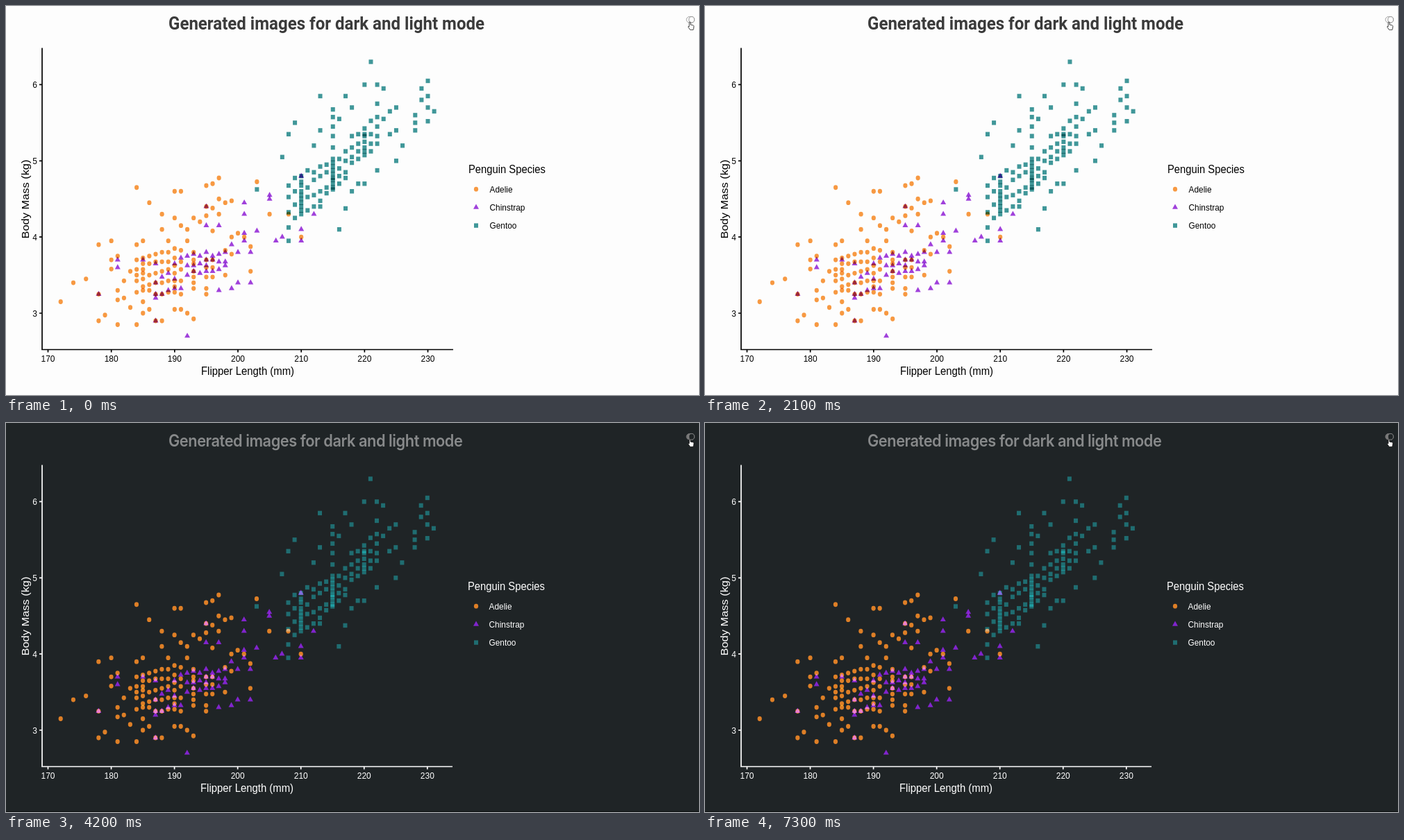
Animation of 998x561 px, one loop 7700 ms. Source, as an HTML page:

```html
<!DOCTYPE html>
<html lang="en">
<head>
<meta charset="utf-8">
<title>Dark and light chart</title>
<style>
  html, body { margin: 0; width: 100%; height: 100%; overflow: hidden; background: #fdfdfd; }
  svg { position: absolute; left: 0; top: 0; display: block; isolation: isolate; }
  text { font-family: "Liberation Sans", Arial, sans-serif; }
  .light .mark { mix-blend-mode: multiply; }
  .dark .mark { mix-blend-mode: screen; }
  .light .title { font: 700 26.5px Roboto, sans-serif; }
  .dark .title { font: 600 24px Inter, sans-serif; letter-spacing: -.5px; }
</style>
</head>
<body>
<script>
const LOOP = 7700, SWITCH = 3500;
const W = 998, H = 561;
const SQUEEZE = 0.908; // the whole page is narrowed horizontally

const themes = {
  light: {
    back: '#fdfdfd', ink: '#000', title: '#3b3b3b', colors: ['#f99a42', '#a140dd', '#40989a'],
    perMm: 9.117, axisEnd: 644, legend: 666,
    pill: 'none', knob: '#fdfdfd', rim: '#888', hand: '#333'
  },
  dark: {
    back: '#1f2426', ink: '#fff', title: '#87898a', colors: ['#da6a00', '#7000c4', '#005558'],
    perMm: 9.105, axisEnd: 643, legend: 665,
    pill: '#777', knob: '#1f2426', rim: '#888', hand: '#111'
  }
};

// Outlying values by column, from the given length upward; bands fill the dense core.
const species = [
  {
    name: 'Adelie', start: 172,
    outer: [[3.15], [], [3.4], [], [3.45], [], [3.9, 3.25, 2.9], [2.975], [3.95, 3.7, 3.58],
      [3.75, 3.3, 3.175, 2.85], [3.425, 3.2], [3.55, 3.075], [4.65, 3.9, 2.85], [3.95, 3.15, 3],
      [4.45, 3.05], [2.9], [4.3, 4.1, 2.9], [3.95], [4.6, 4.25, 3.05], [4.6, 4.15, 3.05],
      [4.1, 3.95, 3], [4.25, 2.925], [4.2], [4.675, 4.4, 4.28, 3.25], [4.7, 4.38, 4.08],
      [4.775, 4.5, 4.3], [4.45, 3.825, 3.5], [4.475, 4, 3.775], [4.05], [4], [3.875, 3.55],
      [4.725], [], [4.3], [], [], [4.3], [], [4]],
    bands: [
      { from: 184, to: 191, low: [3.3, 3.25], high: [3.7, 3.85], n: 5, heap: 7 },
      { from: 193, to: 193, low: [3.33, 3.33], high: [3.8, 3.8], n: 7 },
      { from: 195, to: 196, low: [3.33, 3.5], high: [3.7, 3.7], n: 3, heap: 4 }
    ]
  },
  {
    name: 'Chinstrap', start: 178,
    outer: [[3.25], [], [], [3.7, 3.6], [], [], [], [3.7], [], [3.65, 3.2, 2.9], [], [], [], [],
      [2.7], [], [], [4.4, 4.15], [], [4.15, 3.3], [], [3.9, 3.325], [3.8, 3.4],
      [4.45, 4.3, 4.05, 3.95], [3.8, 3.4], [4.08], [], [4.55, 4.5], [3.95], [4], [], [],
      [4.8, 4.1, 3.95], [], [4.3]],
    bands: [
      { from: 187, to: 191, low: [3.25, 3.3], high: [3.4, 3.7], n: 2, heap: 3 },
      { from: 192, to: 198, low: [3.5, 3.6], high: [3.75, 3.8], n: 3, heap: 4 }
    ]
  },
  {
    name: 'Gentoo', start: 203,
    outer: [[4.625], [], [], [], [5.05], [5.35, 3.95], [5.5], [], [], [5.2], [5.85, 5.4, 4.4], [],
      [], [5.55, 4.1], [5.85, 4.375], [5.7, 4.6], [4.7], [6, 4.7], [6.3], [6, 5.75, 4.875],
      [5.95, 5.55], [5.65, 5.35], [5.7, 5.4, 5], [5.2], [], [5.6, 5.5, 5.4], [5.95, 5.8],
      [6.05, 5.85, 5.7, 5.52], [5.65]],
    bands: [
      { from: 208, to: 217, low: [4.15, 4.75], high: [4.7, 5.1], n: 4, heap: 10 },
      { from: 215, to: 215, low: [5.2, 5.2], high: [5.65, 5.65], n: 5, heap: 5 },
      { from: 218, to: 222, low: [4.95, 5.2], high: [5.3, 5.55], n: 4, heap: 7 }
    ]
  }
];

let seed = 7;
const random = () => (seed = (seed * 16807) % 2147483647) / 2147483647;
const mix = (pair, k) => pair[0] + (pair[1] - pair[0]) * k;

function fillBand({ from, to, low, high, n, heap }) {
  const dots = [];
  for (let x = from; x <= to; x++) {
    const k = (x - from) / (to - from || 1);
    const count = x % 5 ? n : heap; // readings pile up on round lengths
    for (let i = 0; i < count; i++) {
      const at = (i + (random() - 0.5) * 0.5) / (count - 1);
      dots.push([x, Math.round(mix([mix(low, k), mix(high, k)], at) * 40) / 40]);
    }
  }
  return dots;
}

for (const s of species) {
  s.dots = s.outer.flatMap((ys, i) => ys.map(y => [s.start + i, y]));
  s.dots.push(...s.bands.flatMap(fillBand));
}

function add(parent, tag, attrs, content) {
  const el = document.createElementNS('http://www.w3.org/2000/svg', tag);
  for (const key in attrs) el.setAttribute(key, attrs[key]);
  if (content) el.textContent = content;
  parent.append(el);
  return el;
}

function label(svg, content, x, y, size, fill, anchor = 'start', turn = 0) {
  return add(svg, 'text', {
    transform: `translate(${x} ${y}) scale(${SQUEEZE} 1) rotate(${turn})`,
    'font-size': size, 'text-anchor': anchor, fill
  }, content);
}

const marks = [
  (svg, x, y, fill) => add(svg, 'ellipse', { class: 'mark', cx: x, cy: y, rx: 3.1, ry: 3.4, fill }),
  (svg, x, y, fill) => add(svg, 'path', { class: 'mark', d: `M${x} ${y - 4.8}l4 7.2h-8z`, fill }),
  (svg, x, y, fill) => add(svg, 'rect', { class: 'mark', x: x - 3, y: y - 3.2, width: 6, height: 6.4, fill })
];

function drawAxes(svg, t, px, py) {
  let d = `M52 60.5V495.5M51.1 495.5H${t.axisEnd}`;
  for (let kg = 3; kg <= 6; kg++) {
    d += `M48 ${py(kg)}H52`;
    label(svg, kg, 45, py(kg) + 4.8, 13.2, t.ink, 'end');
  }
  for (let mm = 170; mm <= 230; mm += 10) {
    d += `M${px(mm)} 495.5V499.5`;
    label(svg, mm, px(mm), 512.8, 13.2, t.ink, 'middle');
  }
  add(svg, 'path', { d, stroke: t.ink, 'stroke-width': 1.7, fill: 'none' });
  label(svg, 'Flipper Length (mm)', t.legend - 318, 531.7, 16.4, t.ink, 'middle');
  label(svg, 'Body Mass (kg)', 33, 278.5, 16.4, t.ink, 'middle', -90);
}

function drawLegend(svg, t) {
  label(svg, 'Penguin Species', t.legend, 240.8, 16.3, t.ink);
  species.forEach((s, i) => {
    const y = 264.2 + i * 26.2;
    marks[i](svg, 677, y, t.colors[i]);
    label(svg, s.name, t.legend + 30.5, y + 4.8, 13.1, t.ink);
  });
}

function drawSwitch(svg, t) {
  add(svg, 'rect', { x: 980, y: 15.4, width: 11.4, height: 8.6, rx: 4.3, fill: t.pill, stroke: t.rim, 'stroke-width': 0.8 });
  add(svg, 'ellipse', { cx: 987.4, cy: 19.7, rx: 3.9, ry: 4.3, fill: t.knob, stroke: t.rim, 'stroke-width': 0.9 });
  add(svg, 'path', {
    d: 'M984 29V23.6q.9-1.4 1.9 0V27l3.5.7q1.4.4 1.3 2L989.8 34.3h-4.6l-2.8-4.2q0-1.5 1.6-.4z',
    fill: '#fff', stroke: t.hand, 'stroke-width': 0.9
  });
}

function drawScene(name) {
  const t = themes[name];
  const px = mm => 60.5 + (mm - 170) * t.perMm;
  const py = kg => 443 - (kg - 3) * 109.85;
  const svg = add(document.body, 'svg', { class: name, width: W, height: H, viewBox: `0 0 ${W} ${H}` });
  add(svg, 'rect', { width: W, height: H, fill: t.back });
  if (name === 'dark') add(svg, 'rect', { y: H - 1, width: W, height: 1, fill: '#0e1112' });
  label(svg, 'Generated images for dark and light mode', 234, 33.5, 24, t.title).setAttribute('class', 'title');
  species.forEach((s, i) => s.dots.forEach(([x, y]) => marks[i](svg, px(x), py(y), t.colors[i])));
  drawAxes(svg, t, px, py);
  drawLegend(svg, t);
  drawSwitch(svg, t);
  return svg;
}

drawScene('light');
drawScene('dark').animate([
  { visibility: 'hidden', offset: 0, easing: 'step-end' },
  { visibility: 'visible', offset: SWITCH / LOOP, easing: 'step-end' },
  { visibility: 'visible', offset: 1 }
], { duration: LOOP, iterations: Infinity });
</script>
</body>
</html>
```
